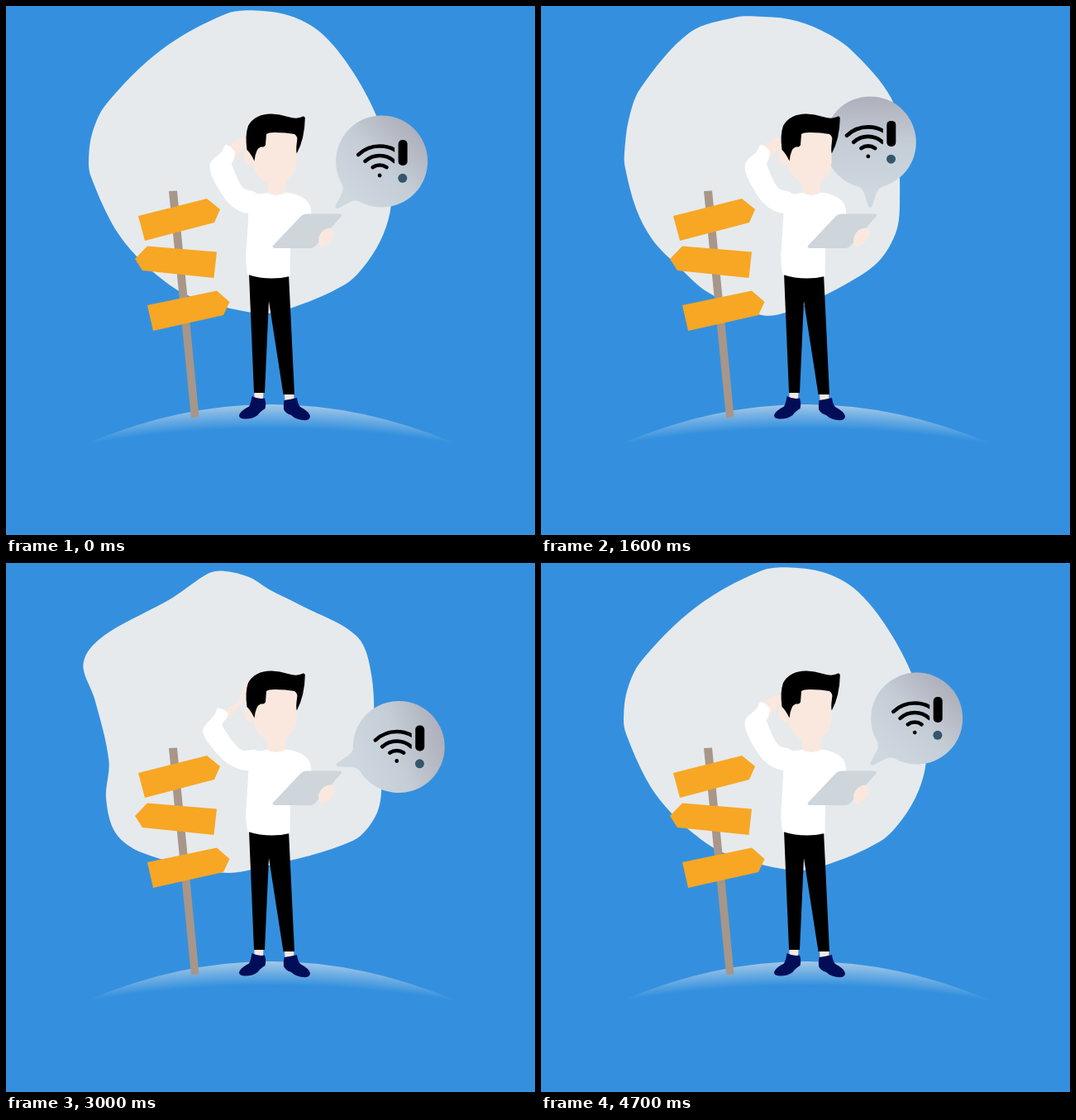
An HTML page with a canvas that plays this animation: 640x640 px, repeating every 4800 ms.

```html
<!DOCTYPE html>
<html lang="en">
<head>
<meta charset="utf-8">
<title>Lost without a connection</title>
<style>
html, body { margin: 0; width: 100%; height: 100%; overflow: hidden; background: #3490de; }
canvas { display: block; width: 640px; height: 640px; }
</style>
</head>
<body>
<canvas id="stage" width="640" height="640"></canvas>
<script>
const ctx = document.getElementById('stage').getContext('2d');
const LOOP = 4800, STEP = 100;
const SKIN = '#fae8de', PALE = '#e6eaed', SIGN = '#f7a723', NAVY = '#020d58';

// Backdrop outlines, clockwise from the top, matched point by point
const egg = [302,5.5, 347,13, 385,36, 425,88, 455,150, 465,195, 466,240, 457,275,
  437,310, 410,337, 340,367, 302,371.5, 222,351, 183,326, 150,294, 127,261,
  103,207, 100,190, 104,155, 121,119, 188,53, 265,10];
const pebble = [259,12.5, 300,16, 338,29, 375,53, 424,112, 432,160, 434,240, 430,272,
  412,305, 385,327, 315,363, 270,374.5, 203,347, 165,314, 135,283, 115,245,
  101.5,194, 101,177, 106,138, 120,100, 180,32, 236,13.5];
const cloud = [263.7,9.6, 294,17, 319,32.5, 354,50, 425,89, 442.5,137, 447,222.5, 454.5,267.5,
  448,305, 420,336, 311.5,367.5, 260.5,374.5, 164.5,350.5, 132.5,327, 121,285.5, 124.5,239,
  107,163.5, 93.5,127, 100,105.5, 126,82.5, 201,42.5, 245,12.5];
const POSES = [
  { blob: egg, turn: 44.6 },
  { blob: pebble, turn: 0 },
  { blob: cloud, turn: 74.3 }
];
const ARM_KEYS = [[0, 0], [800, 1], [1600, 0], [3500, 1], [4800, 0]];

// Arm outlines: hand low, hand high
const SLEEVE = [
  [303,227, 287,220, 273,191, 275,187, 276,182, 277,176, 266,168, 261,176, 247,191, 252,212, 272,241, 295,250],
  [303,227, 284,226, 261,197, 263,192, 266,188, 268,182, 256,176, 252,184, 238,202, 244,217, 270,244, 295,250]
];
const FOREARM = [
  [266,175, 279,162, 292,161, 294,171, 287,174, 274,185],
  [256,183, 281,168, 290,142, 298,152, 289,165, 265,190]
];

const lerp = (a, b, k) => a + (b - a) * k;
const mix = (p, q, k) => p.map((v, i) => lerp(v, q[i], k));

// cubic-bezier(.25, .1, .25, 1)
function ease(x) {
  let lo = 0, hi = 1;
  for (let i = 0; i < 24; i++) {
    const s = (lo + hi) / 2;
    if (0.75 * s * (1 - s) + s * s * s < x) lo = s; else hi = s;
  }
  const s = lo, r = 1 - s;
  return 0.3 * s * r * r + 3 * s * s * r + s * s * s;
}

function keyed(keys, t) {
  let i = 0;
  while (i < keys.length - 2 && t >= keys[i + 1][0]) i++;
  const [t0, a] = keys[i], [t1, b] = keys[i + 1];
  return lerp(a, b, ease((t - t0) / (t1 - t0)));
}

function fillPath(d, color) {
  ctx.fillStyle = color;
  ctx.fill(new Path2D(d));
}

function poly(pts, color) {
  fillPath('M' + pts.join(' ') + 'Z', color);
}

// Closed curve through all points
function smooth(pts, color) {
  const n = pts.length / 2;
  const at = i => [pts[(i + n) % n * 2], pts[(i + n) % n * 2 + 1]];
  ctx.beginPath();
  ctx.moveTo(pts[0], pts[1]);
  for (let i = 0; i < n; i++) {
    const [a, b, c, d] = [at(i - 1), at(i), at(i + 1), at(i + 2)];
    const len = Math.hypot(c[0] - b[0], c[1] - b[1]);
    const before = Math.hypot(b[0] - a[0], b[1] - a[1]);
    const after = Math.hypot(d[0] - c[0], d[1] - c[1]);
    const u = 2 * len / (len + before) / 6, v = 2 * len / (len + after) / 6;
    ctx.bezierCurveTo(
      b[0] + (c[0] - a[0]) * u, b[1] + (c[1] - a[1]) * u,
      c[0] - (d[0] - b[0]) * v, c[1] - (d[1] - b[1]) * v, c[0], c[1]);
  }
  ctx.fillStyle = color;
  ctx.fill();
}

function disc(x, y, r, color) {
  ctx.beginPath();
  ctx.arc(x, y, r, 0, 7);
  ctx.fillStyle = color;
  ctx.fill();
}

function ground() {
  const g = ctx.createRadialGradient(320, 1844, 1333, 320, 1844, 1362);
  g.addColorStop(0, 'rgba(230,234,237,0)');
  g.addColorStop(1, 'rgba(230,234,237,.62)');
  fillPath('M100 528.5Q320 435.5 542 528.5Z', g);
}

function signpost() {
  poly([197,224, 207,223.5, 233.5,497, 224,498.5], '#a89688');
  poly([160,254, 243,233, 259,246, 252,262, 168,284], SIGN);
  poly([156,306, 171,290.5, 255,297.5, 251.5,329, 165,320], SIGN);
  poly([171,362, 255,344.5, 270.5,358, 263,374, 178,393], SIGN);
}

function bubble(deg) {
  const a = deg * Math.PI / 180;
  ctx.save();
  ctx.translate(398.3 + 80.2 * Math.sin(a), 245.1 - 80.2 * Math.cos(a));

  ctx.save();
  ctx.rotate(a);
  const g = ctx.createLinearGradient(0, 62, 0, -56);
  g.addColorStop(0, '#cfd8df');
  g.addColorStop(0.5, '#c5ced7');
  g.addColorStop(1, '#aeafbb');
  disc(0, 0, 55.5, g);
  fillPath('M-20 50Q-9 55 -7.5 61L-2.6 76.5Q0 81.5 2.6 76.5L7.5 61Q9.5 55 20 50Z', g);
  ctx.restore();

  ctx.save();
  ctx.beginPath();
  ctx.rect(-60, -60, 75.5, 120);
  ctx.clip();
  ctx.lineWidth = 4.6;
  ctx.lineCap = 'round';
  ctx.strokeStyle = '#000';
  for (const [r, half] of [[37.5, 0.76], [26, 0.74], [14.5, 0.62]]) {
    ctx.beginPath();
    ctx.arc(-2.5, 19, r, -Math.PI / 2 - half, -Math.PI / 2 + half);
    ctx.stroke();
  }
  disc(-2.5, 17, 2.4, '#000');
  ctx.restore();

  ctx.beginPath();
  ctx.roundRect(20, -26, 11, 31, 5);
  ctx.fillStyle = '#000';
  ctx.fill();
  disc(25.2, 20.3, 5.5, '#34566c');
  ctx.restore();
}

function man(bend) {
  // feet and legs
  poly([300.5,465, 311.5,465, 311,477, 300.5,477], SKIN);
  poly([337,467, 348.5,467, 348,479, 337.5,479], SKIN);
  fillPath('M297.5 472Q305 476 313 474.5Q315 481 313.5 487Q307 491 304.5 495Q298 500 288 499.5Q282 499 282 495.5Q283 490 294 484.5Q296.5 480 297.5 472Z', NAVY);
  fillPath('M336.5 477Q344 476 352 474Q353 482 356 485Q367 491 368 496Q368 501 362 501.3Q351 501 345 495Q338 493 336 488Q335.5 483 336.5 477Z', NAVY);
  fillPath('M294 324L342 324L349 470L335.5 470L318 357L313 468L300 468Z', '#000');

  smooth(mix(FOREARM[0], FOREARM[1], bend), SKIN);

  // torso and sleeve
  fillPath('M303 227Q310 228 317 225.5L337 225.5Q357 227 366 238Q370 245 369 256L344 293L343.5 327Q318 333 292.5 325Q289 310 291 290Q292.5 270 293.5 248L290 235Z', '#fff');
  smooth(mix(SLEEVE[0], SLEEVE[1], bend), '#fff');

  // head
  fillPath('M316 211L338 209L338 226Q327 232 316 226Z', SKIN);
  ctx.beginPath();
  ctx.ellipse(294.5, 183, 6.5, 10, -0.25, 0, 7);
  ctx.fill();
  fillPath('M299 150L351.5 150L351.5 190Q350 204 339 212Q328 219 316 214.5Q301 207 298.5 188Z', SKIN);
  fillPath('M300.5 187.5Q296 178 291.5 174Q289 156 293 145Q301 130.5 321 130.5Q331 130.5 341 134Q351 137 357 134.5Q361 132 361.8 135.5Q361.5 160 351.8 178.5Q350.5 175 352 164Q353.5 158 349 155Q339 153 325 153Q317 153 315 155Q314.5 161 314 168Q313 171 308 170.5Q302 173 300.5 187.5Z', '#000');

  // tablet and hand
  fillPath('M363 251.5L403.5 251.5Q407.5 252 405.5 254.5L375 289.5Q372 293 369 293L325 293Q321 292.5 323.5 289.5L357 254Q360 251.5 363 251.5Z', '#ced5db');
  fillPath('M378.5 287Q376.5 278 384 271.5Q391 267 395 269.5Q399 275 395 282Q389 290 382 291Q379 290.5 378.5 287Z', SKIN);
}

function draw(t) {
  const third = LOOP / 3;
  const i = Math.floor(t / third);
  const from = POSES[i], to = POSES[(i + 1) % 3];
  const k = ease((t % third) / third);
  ctx.fillStyle = '#3490de';
  ctx.fillRect(0, 0, 640, 640);
  smooth(mix(from.blob, to.blob, k), PALE);
  ground();
  bubble(lerp(from.turn, to.turn, k));
  signpost();
  man(keyed(ARM_KEYS, t));
}

const start = performance.now();
function tick() {
  const t = (performance.now() - start) % LOOP;
  draw(Math.floor(t / STEP) * STEP);
  requestAnimationFrame(tick);
}
tick();
</script>
</body>
</html>
```
